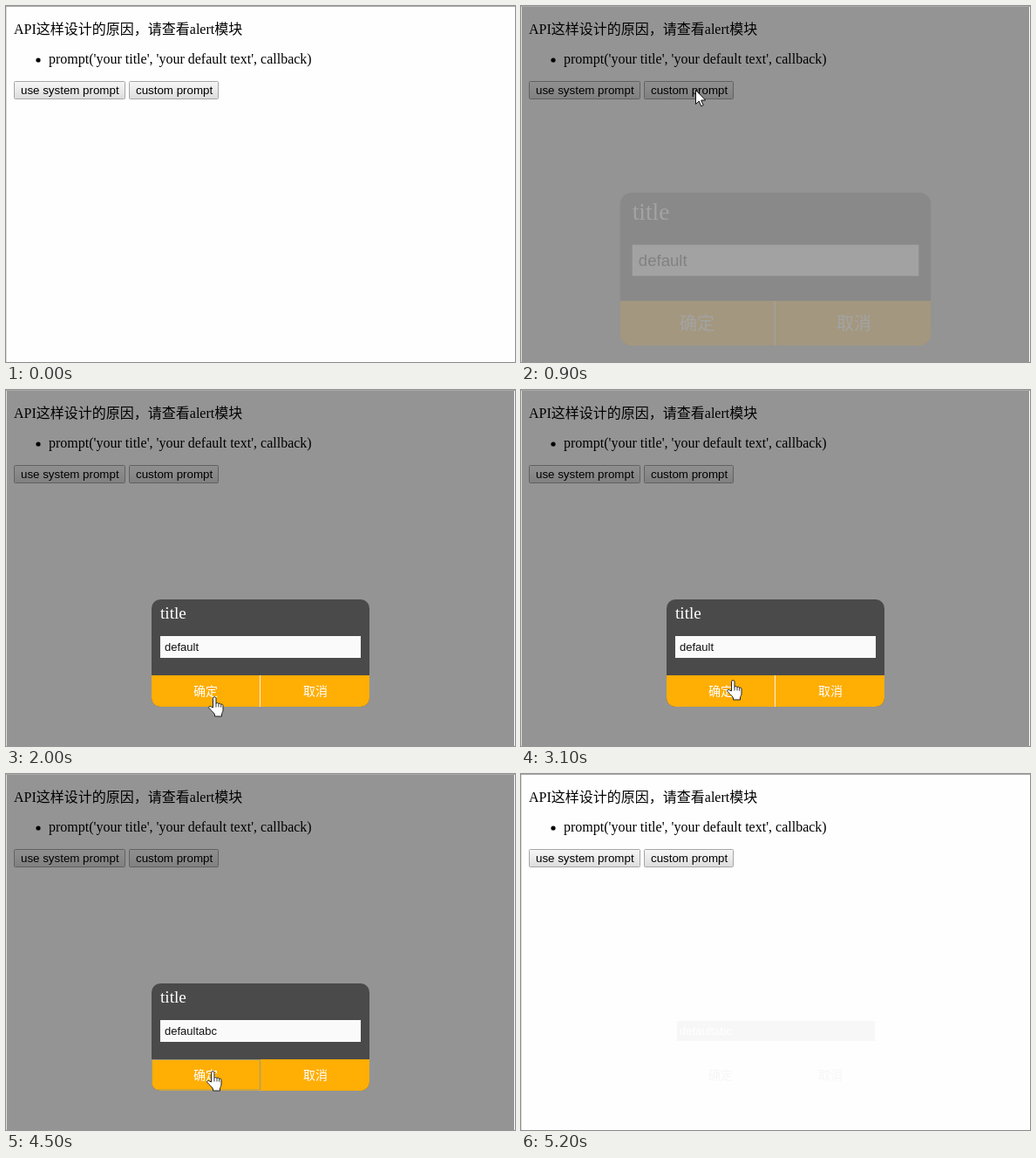
Recreate the animation shown at these times as an HTML page. Size 584x408 px, loop 6.1 s.

```html
<!DOCTYPE html>
<html lang="zh">
<head>
<meta charset="utf-8">
<title>prompt demo</title>
<style>
  html, body { margin: 0; width: 100%; height: 100%; overflow: hidden; background: #fefefe; }
  svg { display: block; width: 584px; height: 408px; }
  text { white-space: pre; }
  .serif { font-family: "Liberation Serif", "Noto Sans CJK SC", "Noto Sans CJK", serif; font-size: 16px; }
  .cjk { font-family: "Noto Sans CJK SC", "Noto Sans CJK", sans-serif; font-weight: 300; }
  .ui { font-family: "Liberation Sans", sans-serif; font-size: 13.333px; }
  .field { font-family: "Liberation Sans", sans-serif; font-size: 13px; }
  .label { font-size: 14px; text-anchor: middle; }
  .btn { fill: url(#face); stroke: #a6a6a6; }
  .btn.hover { fill: url(#faceHover); stroke: #7c7c7c; }
</style>
</head>
<body>
<svg viewBox="0 0 584 408" xmlns="http://www.w3.org/2000/svg">
  <defs>
    <linearGradient id="face" x2="0" y2="1">
      <stop offset="0" stop-color="#f6f6f6"/><stop offset=".4" stop-color="#ededed"/><stop offset="1" stop-color="#dcdcdc"/>
    </linearGradient>
    <linearGradient id="faceHover" x2="0" y2="1">
      <stop offset="0" stop-color="#fafafa"/><stop offset=".4" stop-color="#f2f2f2"/><stop offset="1" stop-color="#e4e4e4"/>
    </linearGradient>
    <clipPath id="round"><rect x="167" y="240" width="250" height="123" rx="10"/></clipPath>
  </defs>

  <rect width="584" height="408" fill="#fefefe"/>
  <rect width="1" height="408" fill="#dcdcdc"/>
  <rect width="584" height="1" fill="#a8a8a8"/>

  <text class="serif" x="9" y="32">API<tspan class="cjk">这样设计的原因，请查看</tspan>alert<tspan class="cjk">模块</tspan></text>
  <circle cx="37" cy="62" r="2.6"/>
  <text class="serif" x="49" y="66">prompt('your title', 'your default text', callback)</text>
  <rect class="btn" x="9.5" y="86.5" width="127" height="20" rx="1"/>
  <text class="ui" x="17" y="101">use system prompt</text>
  <rect class="btn" id="custom" x="141.5" y="86.5" width="102" height="20" rx="1"/>
  <text class="ui" x="149" y="101">custom prompt</text>

  <g id="trace">
    <rect x="179" y="283" width="227" height="23" fill="#f7f7f7"/>
    <text class="field" x="182" y="299" fill="#fff">defaultabc</text>
    <g class="cjk label" fill="#f6f6f6">
      <text x="229" y="350">确定</text><text x="355" y="350">取消</text>
    </g>
  </g>

  <rect id="shade" x="1" y="1" width="582" height="407" fill="#000" fill-opacity=".42"/>

  <g id="dialog">
    <g clip-path="url(#round)">
      <rect x="167" y="240" width="250" height="123" fill="#4a4a4a"/>
      <rect x="167" y="327" width="250" height="36" fill="#ffae03"/>
      <rect id="split" x="291" y="327" width="1" height="36" fill="#fff3d6"/>
      <rect id="okRing" x="167.5" y="327.5" width="124" height="34.5" fill="none" stroke="#a39c72"/>
    </g>
    <text class="serif" x="177" y="262" fill="#fff" style="font-size:19.2px">title</text>
    <rect x="177" y="282" width="230" height="25" fill="#fafafa"/>
    <rect id="fieldRing" x="176.5" y="281.5" width="231" height="26" fill="none" stroke="#7d9fd0"/>
    <text class="field" id="value" x="182" y="299" fill="#111"></text>
    <rect id="caret" y="287" width="1" height="15" fill="#111"/>
    <g class="cjk label" fill="#fff">
      <text x="229" y="350">确定</text><text x="355" y="350">取消</text>
    </g>
  </g>

  <g id="pointer">
    <path id="arrow" d="M.5 .5V16.5L4.2 13L6.7 18.8L9.2 17.7L6.7 12H11.7Z" fill="#fff" stroke="#111"/>
    <path id="beam" d="M-3 -7.5h2.4l.6 .6l.6 -.6H3M0 -7V7M-3 7.5h2.4l.6 -.6l.6 .6H3" fill="none" stroke="#111"/>
    <g id="hand" transform="translate(-7 -1)">
      <path d="M5.5 13V2.5a1.75 1.75 0 0 1 3.5 0V8.5c0-1.3 3-1.3 3 .5c0-1.3 2.7-1.1 2.7 .8c.3-1.1 2.3-.9 2.3 .9V16c0 2-1.5 3-1.5 5v2H7.5V21C6 18 3 16 1 13.5c-1-1.7 1-2.7 2.2-1.6z" fill="#fff" stroke="#222"/>
      <path d="M9 8.5v4M12 9v3.5M14.7 10v2.7" fill="none" stroke="#222" stroke-width=".9"/>
    </g>
  </g>
</svg>
<script>
const LOOP = 6100, STEP = 100;
const OPEN = 800, CLOSE = 4600;
const el = id => document.getElementById(id);
const show = (id, on) => el(id).setAttribute('visibility', on ? 'visible' : 'hidden');

// pointer hot spot: time, x, y
const path = [
  [200, 397, 31], [300, 300, 55], [400, 232, 80], [500, 206, 92], [600, 200, 96],
  [1300, 200, 96], [1400, 199, 139], [1600, 211, 232], [1800, 230, 320], [2000, 239, 352],
  [3000, 239, 352], [3100, 243, 333], [3200, 252, 299],
  [4000, 252, 299], [4200, 245, 325], [4400, 237, 341],
  [4800, 237, 341], [4900, 280, 303], [5000, 425, 188], [5100, 573, 74], [5200, 584, 74]
];

function pointerAt(t) {
  const i = path.findIndex(k => k[0] > t);
  if (i < 1) return null;
  const [t0, x0, y0] = path[i - 1], [t1, x1, y1] = path[i];
  const p = (t - t0) / (t1 - t0);
  return [Math.round(x0 + (x1 - x0) * p), Math.round(y0 + (y1 - y0) * p)];
}

// cubic-bezier(.25, .1, .25, 1)
function ease(x) {
  if (x <= 0) return 0;
  if (x >= 1) return 1;
  const curve = (s, a, b) => 3 * a * s * (1 - s) ** 2 + 3 * b * s * s * (1 - s) + s ** 3;
  let lo = 0, hi = 1;
  for (let i = 0; i < 24; i++) {
    const mid = (lo + hi) / 2;
    if (curve(mid, .25, .25) < x) lo = mid; else hi = mid;
  }
  return curve(lo, .1, 1);
}

function drawDialog(t, open) {
  const p = ease((t - 836) / 500), s = 1.5 - .5 * p;
  el('dialog').setAttribute('transform', `translate(292 301.5) scale(${s}) translate(-292 -301.5)`);
  el('dialog').setAttribute('opacity', p);

  const typed = t < 3600 ? 0 : Math.min(3, Math.floor((t - 3400) / 200));
  const focus = open && t >= 3400 && t < 4400;
  const pressed = open && t >= 4400;
  el('value').textContent = 'default' + 'abc'.slice(0, typed);
  el('caret').setAttribute('x', 221 + 7 * typed);
  show('caret', focus);
  show('fieldRing', focus);
  show('okRing', pressed);
  el('split').setAttribute('fill', pressed ? '#ffc859' : '#fff3d6');
}

function drawPointer(t, open) {
  const at = pointerAt(t);
  let kind = '';
  if (at) {
    const [x, y] = at;
    const inside = open && x > 167 && x < 417;
    kind = inside && y >= 327 && y < 363 ? 'hand' : inside && y >= 282 && y < 307 ? 'beam' : 'arrow';
    el('pointer').setAttribute('transform', `translate(${x} ${y})`);
  }
  for (const k of ['arrow', 'beam', 'hand']) show(k, k === kind);
}

function draw(now) {
  const t = Math.floor((now % LOOP) / STEP) * STEP;
  const open = t >= OPEN && t < CLOSE;
  el('custom').classList.toggle('hover', t >= 500 && t < OPEN);
  el('shade').style.display = el('dialog').style.display = open ? '' : 'none';
  el('trace').style.display = t >= CLOSE ? '' : 'none';
  drawDialog(t, open);
  drawPointer(t, open);
}

const start = performance.now();
function tick() {
  draw(performance.now() - start);
  requestAnimationFrame(tick);
}
tick();
</script>
</body>
</html>
```
